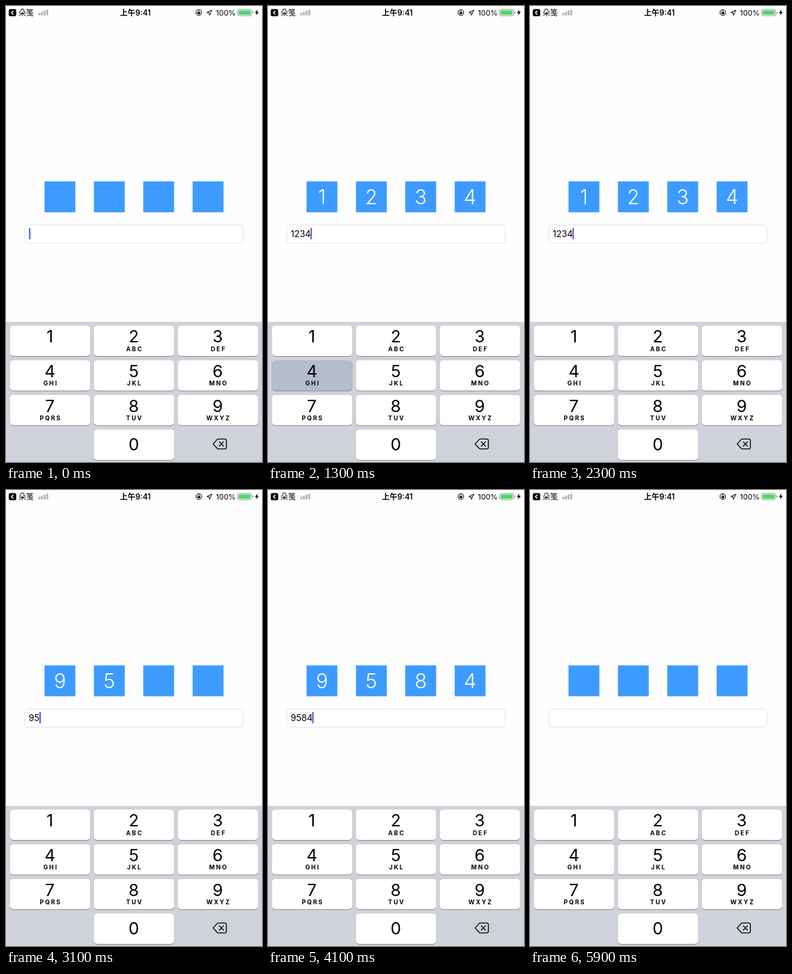
These frames come from a looping animation (375x667 px, 6000 ms). An HTML page:

```html
<!DOCTYPE html>
<html lang="zh">
<head>
<meta charset="utf-8">
<title>Code input</title>
<style>
html, body { margin: 0; width: 100%; height: 100%; overflow: hidden; background: #fefefe; }
svg { display: block; width: 375px; height: 667px; font-family: Inter, "Noto Sans CJK SC", "Noto Sans CJK", sans-serif; }
.mid { text-anchor: middle; }
.num { font-size: 24.5px; }
.sub { font-size: 8.8px; font-weight: 700; letter-spacing: 2px; }
.digit { font-size: 29.5px; font-weight: 300; fill: #fff; }
</style>
</head>
<body>
<svg id="stage" viewBox="0 0 375 667">
  <rect width="375" height="667" fill="#fefefe"/>
  <g id="status" font-size="11">
    <rect x="4" y="4.5" width="11" height="10.5" rx="2.5"/>
    <path d="M10.8 7 8 9.7l2.8 2.7" fill="none" stroke="#fff" stroke-width="1.4"/>
    <text x="18.5" y="13.6">朵笺</text>
    <text class="mid" x="189.5" y="13.5" font-size="11.2" font-weight="600">上午9:41</text>
    <g fill="none" stroke="#000">
      <circle cx="282.5" cy="9.6" r="4.1"/>
      <path d="M281.2 9.4V8.2a1.3 1.3 0 0 1 2.6 0v1.2" stroke-width=".8"/>
      <path d="M294 9.7 301.6 6 298 13.6 297.7 9.9Z" stroke-width="1" stroke-linejoin="round"/>
    </g>
    <rect x="280.5" y="9" width="4" height="3"/>
    <text x="307.5" y="13.6">100%</text>
    <rect x="339.2" y="5" width="20.6" height="9.2" rx="2.4" fill="none" stroke="#8c8c8c" stroke-width=".9"/>
    <rect x="340.7" y="6.4" width="17.6" height="6.4" rx="1.2" fill="#4cd964"/>
    <path d="M361 8v3.2q1.3-.4 1.3-1.6T361 8Z" fill="#8c8c8c"/>
    <path d="M368.6 5 364.6 10.2H367L366.2 14 370.2 8.8H367.8Z"/>
  </g>
  <g id="boxes"></g>
  <rect x="27.5" y="320.2" width="320" height="26.8" rx="5" fill="#fff" stroke="#e2e3e4"/>
  <text id="entry" x="33.3" y="338" font-size="12.9"></text>
  <rect id="caret" y="324.6" width="2" height="17" rx="1" fill="#4a5ade"/>
  <rect y="462" width="375" height="205" fill="#d0d2d9"/>
  <g id="keys"></g>
  <g id="back" stroke="#000" stroke-width="1.3" stroke-linejoin="round" stroke-linecap="round" fill="none">
    <path id="tag" d="M303.4 640.6 309 634.4Q310 633.3 311.4 633.3H320.4Q322.8 633.3 322.8 635.7V645.5Q322.8 647.9 320.4 647.9H311.4Q310 647.9 309 646.8Z"/>
    <path id="cross" d="M312.4 637.4 318.6 643.8M318.6 637.4 312.4 643.8"/>
  </g>
</svg>
<script>
const LOOP = 6000;
const $ = id => document.getElementById(id);

function add(parent, tag, attrs, text = "") {
  const el = document.createElementNS("http://www.w3.org/2000/svg", tag);
  for (const k in attrs) el.setAttribute(k, attrs[k]);
  el.textContent = text;
  parent.append(el);
  return el;
}

// signal bars
for (let i = 0; i < 4; i++) {
  const h = 4 + i * 1.5;
  add($("status"), "rect", { x: 47.2 + i * 3.9, y: 13.8 - h, width: 3, height: h, rx: .6, fill: "#b9b9b9" });
}

const digits = [0, 1, 2, 3].map(i => {
  const x = 56.4 + i * 72.35;
  add($("boxes"), "rect", { x, y: 256.5, width: 45.2, height: 45.2, fill: "#3d9bff" });
  return add($("boxes"), "text", { x: x + 22.6, y: 290, class: "mid digit" });
});

const letters = ["", "ABC", "DEF", "GHI", "JKL", "MNO", "PQRS", "TUV", "WXYZ"];
const caps = {};
function addKey(name, col, row, sub) {
  const x = 5.8 + col * 122.9, y = 467.5 + row * 50.7, mid = x + 58.8;
  const box = { x, width: 117.6, height: 44.4, rx: 5 };
  add($("keys"), "rect", { ...box, y: y + 1, fill: "#898b90" });
  caps[name] = add($("keys"), "rect", { ...box, y });
  add($("keys"), "text", { x: mid - .3, y: y + (name === "0" ? 30.2 : 24.7), class: "mid num" }, name);
  if (sub) add($("keys"), "text", { x: mid + 1, y: y + 37, class: "mid sub" }, sub);
}
letters.forEach((sub, i) => addKey(String(i + 1), i % 3, Math.floor(i / 3), sub));
addKey("0", 1, 3, "");

// [time, key, how long it stays lit]; "<" deletes
const taps = [
  [600, "1", 0], [800, "2", 100], [1000, "3", 0], [1200, "4", 200],
  [2400, "<", 100], [2500, "<", 100], [2600, "<", 100], [2700, "<", 100],
  [2800, "9", 0], [3000, "5", 100], [3200, "8", 100], [3400, "4", 100],
  [4900, "<", 100], [5200, "<", 100], [5400, "<", 100], [5700, "<", 100]
];
const caretOff = [[1700, 2100], [3800, 4100], [5900, 6000]];

function draw(ms) {
  const t = Math.floor((ms % LOOP) / 100) * 100;
  let text = "", lit = "";
  for (const [at, key, hold] of taps) {
    if (t < at) break;
    text = key === "<" ? text.slice(0, -1) : text + key;
    if (t < at + hold) lit = key;
  }
  digits.forEach((d, i) => d.textContent = text[i] || "");
  $("entry").textContent = text;
  const len = text ? $("entry").getComputedTextLength() : 0;
  $("caret").setAttribute("x", 33.7 + len * .97);
  $("caret").setAttribute("opacity", caretOff.some(([a, b]) => t >= a && t < b) ? 0 : 1);
  for (const k in caps) caps[k].setAttribute("fill", k === lit ? "#b3bdcb" : "#fff");
  $("tag").setAttribute("fill", lit === "<" ? "#000" : "none");
  $("cross").setAttribute("stroke", lit === "<" ? "#d0d2d9" : "#000");
}

const start = performance.now();
function tick() {
  draw(performance.now() - start);
  requestAnimationFrame(tick);
}
tick();
</script>
</body>
</html>
```
